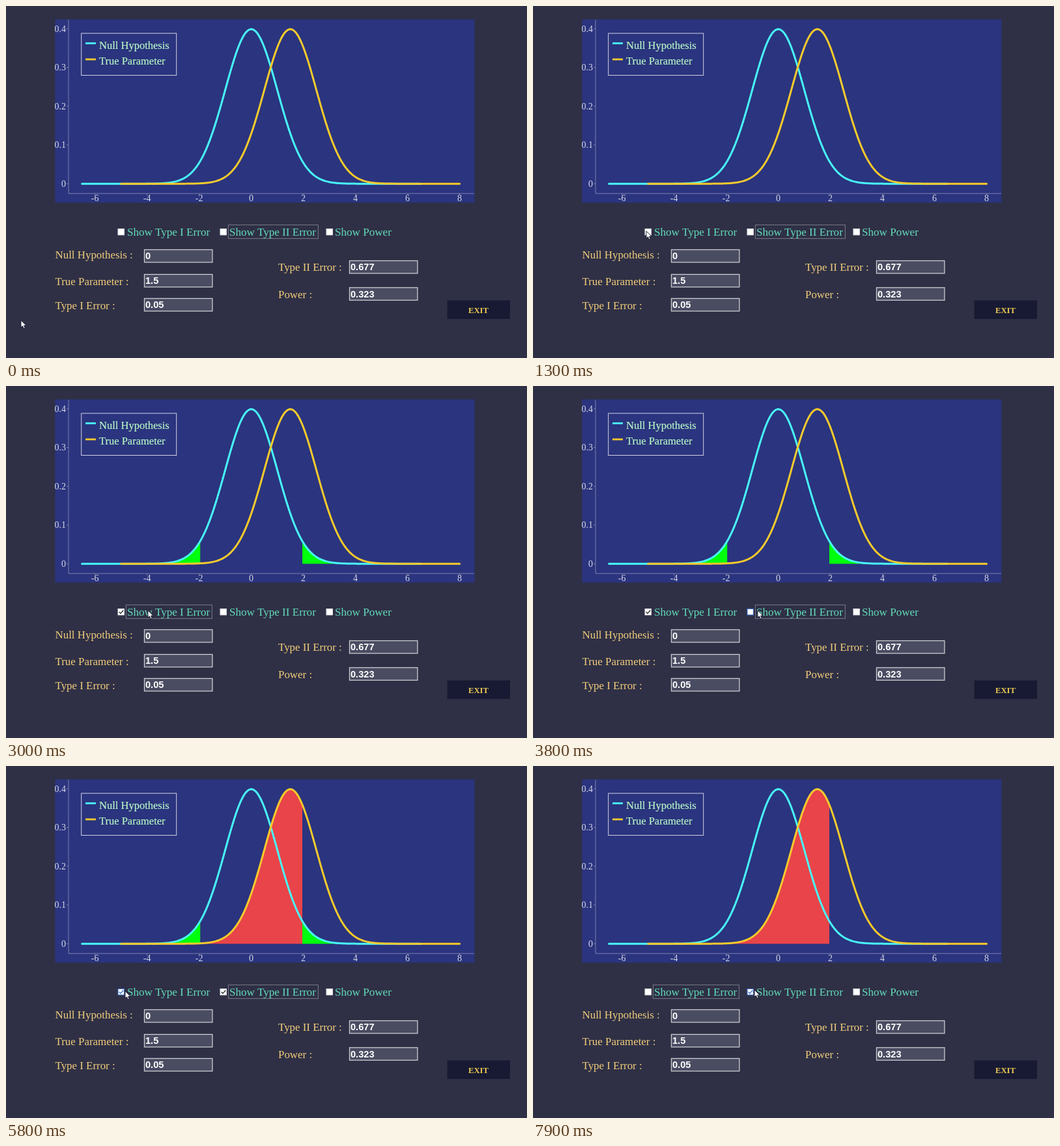
Write an HTML page that moves like this. It is 800 by 541 pixels and loops after 8 s.

```html
<!DOCTYPE html>
<html lang="en">
<head>
<meta charset="utf-8">
<title>Type I and Type II error</title>
<style>
  html, body { margin: 0; width: 100%; height: 100%; overflow: hidden; background: #2f3046; }
  svg { display: block; width: 800px; height: 541px; }
  text { font-family: "Liberation Serif", "Times New Roman", serif; white-space: pre; }
  .tick { font-size: 14px; fill: #d6d8e8; }
  .legend { font-size: 16.5px; fill: #b6f7c6; stroke: #b6f7c6; stroke-width: .2px; }
  .option { font-size: 17.1px; fill: #62dcb9; }
  .label { font-size: 16.9px; fill: #f2cd7a; }
  .value { font: bold 14.6px "Liberation Sans", Arial, sans-serif; fill: #fff; }
  .exit { font-size: 12.6px; font-weight: bold; fill: #f0cb55; }
</style>
</head>
<body>
<svg id="stage" viewBox="0 0 800 541"></svg>
<script>
const LOOP = 8000, STEP = 100;
const stage = document.getElementById('stage');

function add(tag, attrs, text) {
  const el = document.createElementNS('http://www.w3.org/2000/svg', tag);
  for (const key in attrs) el.setAttribute(key, attrs[key]);
  if (text !== undefined) el.textContent = text;
  return stage.appendChild(el);
}
const box = (x, y, width, height, attrs) => add('rect', { x, y, width, height, ...attrs });
const write = (cls, x, y, text, anchor = 'start') =>
  add('text', { class: cls, x, y, 'text-anchor': anchor }, text);
const show = (el, on) => el.setAttribute('visibility', on ? 'visible' : 'hidden');

// Plot scales and normal density
const px = x => 376.6 + 40 * x;
const py = y => 273.2 - 595.5 * y;
const density = (x, mean) => Math.exp(-((x - mean) ** 2) / 2) / Math.sqrt(2 * Math.PI);

function trace(mean, from, to) {
  const n = Math.ceil((to - from) * 20), points = [];
  for (let i = 0; i <= n; i++) {
    const x = from + (to - from) * i / n;
    points.push(px(x).toFixed(2) + ' ' + py(density(x, mean)).toFixed(2));
  }
  return 'M' + points.join('L');
}
const area = (mean, from, to) =>
  `${trace(mean, from, to)}L${px(to)} ${py(0)}L${px(from)} ${py(0)}Z`;
const curve = (mean, from, to, stroke) => add('path', {
  d: trace(mean, from, to), fill: 'none', stroke, 'stroke-width': 3, 'stroke-linecap': 'round'
});

// Chart
box(75.4, 20.6, 644, 281.6, { fill: '#2b347e' });
let axes = 'M96 21V288.2H719';
for (let i = 0; i < 5; i++) {
  const y = py(i / 10);
  axes += `M93 ${y}h3`;
  write('tick', 92, y + 4.7, i ? '0.' + i : '0', 'end');
}
for (let x = -6; x <= 8; x += 2) {
  axes += `M${px(x)} 288.2v3`;
  write('tick', px(x), 300.2, x, 'middle');
}
add('path', { d: axes, fill: 'none', stroke: '#7a80ab' });

const CUT = 1.96;
const typeOne = add('path', { d: area(0, -6.5, -CUT) + area(0, CUT, 6.5), fill: '#00ff0c' });
const typeTwo = add('path', { d: area(1.5, -CUT, CUT), fill: '#e84449' });
curve(0, -6.5, 6.5, '#48f8fb');
curve(1.5, -5, 8, '#f6cb2c');

// Legend
box(115.7, 42, 146, 64.5, { fill: '#2b347e', stroke: '#d0d2e8' });
[['Null Hypothesis', 57.3, '#48f8fb'], ['True Parameter', 82, '#f6cb2c']].forEach(([name, y, stroke]) => {
  add('path', { d: `M122 ${y}h16`, stroke, 'stroke-width': 2.8 });
  write('legend', 143, y + 8.3, name);
});

// Options
const options = [
  ['Show Type I Error', 171, 184, 133],
  ['Show Type II Error', 328, 341, 139],
  ['Show Power', 491, 503, 89]
].map(([name, x, left, width]) => {
  const square = box(x + 1, 342.5, 9.4, 9.4, { fill: '#fff' });
  const mark = add('path', {
    d: `M${x + 2.7} 347.2l2.2 2.4l4.3 -4.8`, fill: 'none', 'stroke-width': 1.3
  });
  const focus = box(left + .4, 336.4, width - 1, 21, { fill: 'none', stroke: '#777985' });
  write('option', left + 2, 352.6, name);
  return { square, mark, focus };
});

// Fields
[
  ['Null Hypothesis :', 75.5, 388.3, 212, 374, '0'],
  ['True Parameter :', 75.5, 429.3, 212, 412, '1.5'],
  ['Type I Error :', 75.5, 465.7, 212, 449, '0.05'],
  ['Type II Error :', 418, 407, 527, 391, '0.677'],
  ['Power :', 418, 448.5, 527, 432.3, '0.323']
].forEach(([name, x, y, left, top, value]) => {
  write('label', x, y, name);
  box(left + .5, top + .5, 104.4, 19.4, { fill: '#4a4c62', stroke: '#ccccd0', 'stroke-width': 1.3 });
  write('value', left + 2, top + 15.2, value);
});
box(677.5, 452.5, 96.5, 28.5, { fill: '#171a32' });
write('exit', 725.5, 471.5, 'EXIT', 'middle');

const pointer = add('path', {
  d: 'M0 0V11L2.5 8.8L4.3 12.8L6.2 12L4.5 8.1H8Z',
  fill: '#fff', stroke: '#15162a', 'stroke-width': .9
});

// Pointer stops: time, x, y
const path = [
  [0, 22.5, 483], [600, 171, 344.5], [800, 174, 345.5], [2700, 174, 345.5], [3600, 345, 344.5],
  [4900, 345, 344.5], [5800, 183, 345.5], [6900, 183, 345.5], [7900, 340, 343.5]
];
// State changes: time, focused option, hovered option, checks
const states = [
  [0, 1, -1, 0, 0], [2000, 0, -1, 0, 0], [2200, 0, 0, 1, 0], [2900, 0, -1, 1, 0],
  [3500, 0, 1, 1, 0], [3800, 1, 1, 1, 0], [4000, 1, 1, 1, 1], [5200, 1, -1, 1, 1],
  [5700, 1, 0, 1, 1], [6300, 0, 0, 1, 1], [6500, 0, 0, 0, 1], [7200, 0, -1, 0, 1],
  [7800, 0, 1, 0, 1]
];
const ease = u => u * u * (3 - 2 * u);

function pointerAt(t) {
  const i = path.findIndex(p => p[0] > t);
  if (i < 0) return path[path.length - 1].slice(1);
  const a = path[i - 1], b = path[i], u = ease((t - a[0]) / (b[0] - a[0]));
  return [a[1] + (b[1] - a[1]) * u, a[2] + (b[2] - a[2]) * u];
}

function draw(t) {
  const [, focused, hovered, one, two] = states.filter(s => s[0] <= t).pop();
  const checks = [one, two, 0];
  options.forEach(({ square, mark, focus }, i) => {
    square.setAttribute('stroke', i === hovered ? '#3568c8' : '#e4e4e8');
    mark.setAttribute('stroke', i === hovered ? '#3568c8' : '#222');
    show(mark, checks[i]);
    show(focus, i === focused);
  });
  show(typeOne, one);
  show(typeTwo, two);
  pointer.setAttribute('transform', `translate(${pointerAt(t).map(Math.round)})`);
}

const start = performance.now();
function tick() {
  const t = (performance.now() - start) % LOOP;
  draw(Math.floor(t / STEP) * STEP);
  requestAnimationFrame(tick);
}
tick();
</script>
</body>
</html>
```
